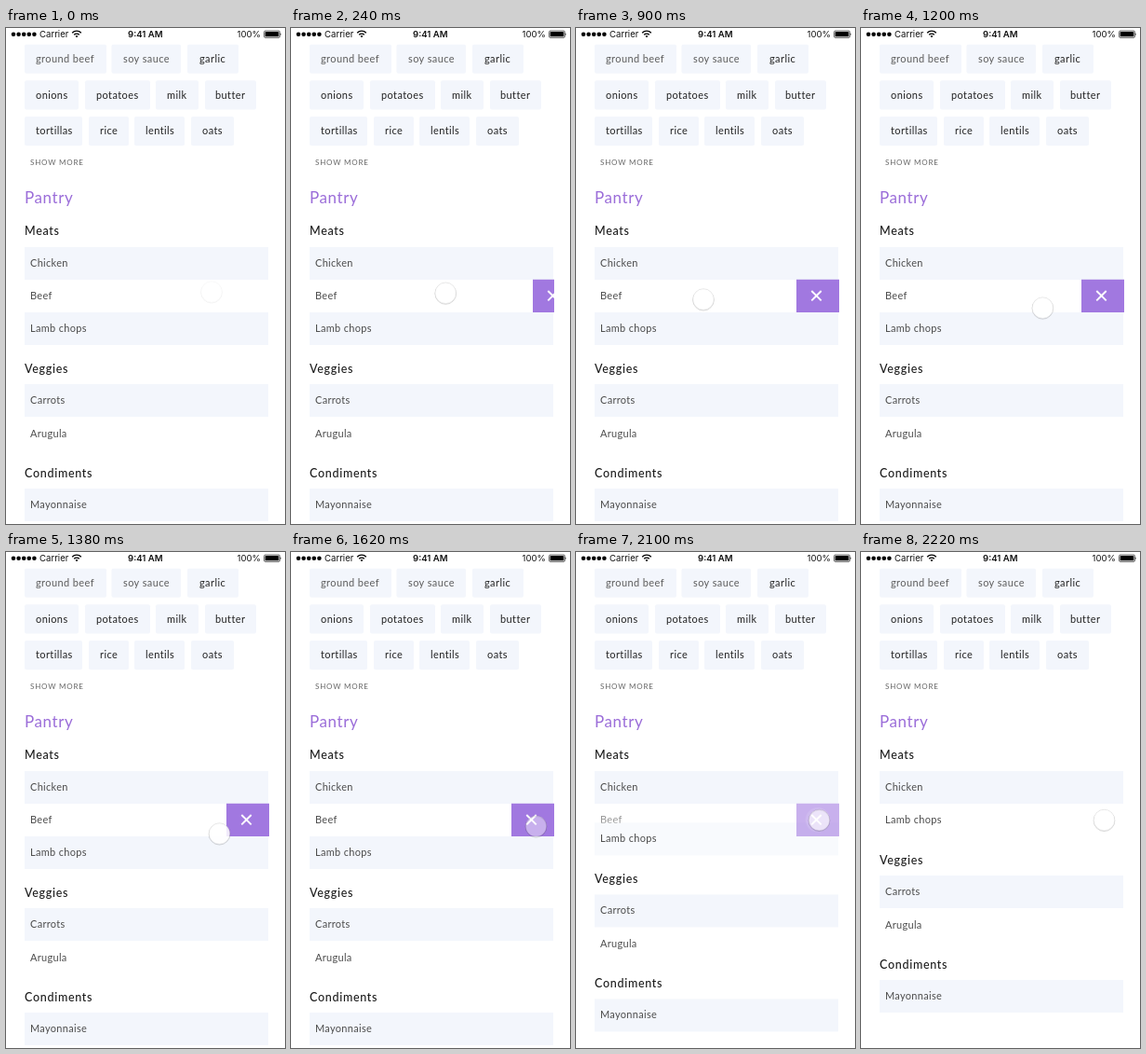
Recreate the animation shown at these times as an HTML page. Size 300 px wide and 532 px high, loop 2340 ms.

```html
<!DOCTYPE html>
<html lang="en">
<head>
<meta charset="utf-8">
<title>Pantry</title>
<style>
html, body { margin: 0; width: 100%; height: 100%; overflow: hidden; background: #fff; }
svg { display: block; width: 300px; height: 532px; }
text { font-family: Lato, "Open Sans", sans-serif; font-size: 11px; letter-spacing: .3px; fill: #4c4c4c; }
.chip { letter-spacing: .4px; fill: #222; }
.dim { fill: #5c5c5c; }
.head { font-size: 12.5px; font-weight: 500; letter-spacing: .7px; fill: #1c1c1c; }
.title { font-size: 17px; letter-spacing: .6px; fill: #9b6dd9; }
.more { font-size: 8px; letter-spacing: .8px; fill: #666; }
.bar text { font: 9.6px Inter, Roboto, sans-serif; letter-spacing: 0; fill: #111; }
.bar .time { font-weight: 600; }
.tint { fill: #f3f6fc; }
</style>
</head>
<body>
<svg viewBox="0 0 300 532">
  <defs><clipPath id="rowClip"><rect x="20" y="269.5" width="263" height="35.5"/></clipPath></defs>
  <g id="chips"></g>
  <text class="more" x="26" y="147.3">SHOW MORE</text>
  <text class="title" x="20" y="188.3">Pantry</text>
  <g id="top"></g>
  <g id="beef"></g>
  <g id="below"></g>
  <g clip-path="url(#rowClip)">
    <g id="remove">
      <rect x="237" y="269.5" width="46" height="35.5" fill="#a178e0"/>
      <path d="M253.3 282l10.4 10.4m0-10.4l-10.4 10.4" stroke="#fff" stroke-width="1.9"/>
    </g>
  </g>
  <circle id="ripple" fill="#fff"/>
  <g id="cursor">
    <circle cy=".8" r="11.3" fill="none" stroke="#000" stroke-opacity=".13"/>
    <circle id="disc" r="11.3" fill="#fff" stroke="#000" stroke-opacity=".12" stroke-width=".7"/>
  </g>
  <g class="bar">
    <rect width="300" height="17.5" fill="#fff"/>
    <path d="M8 6.7h23" stroke="#000" stroke-width="4.6" stroke-linecap="round" stroke-dasharray="0 5.6"/>
    <text x="36" y="10.4">Carrier</text>
    <g fill="none" stroke="#000" stroke-width="1.4">
      <path d="M71.2 5.2a6.6 6.6 0 0 1 9.6 0M73.2 7.3a4 4 0 0 1 5.6 0"/>
    </g>
    <path d="M74.6 8.7a2 2 0 0 1 2.8 0L76 10.2z"/>
    <text class="time" x="131" y="10.4">9:41 AM</text>
    <text x="248.5" y="10.4">100%</text>
    <rect x="277.5" y="3" width="17" height="7.4" rx="1.5" fill="none" stroke="#000" stroke-width=".6"/>
    <rect x="278.6" y="4.1" width="14.8" height="5.2" rx=".6"/>
    <path d="M295.3 5.4q1.4 1.3 0 2.6z"/>
  </g>
</svg>
<script>
const LOOP = 2340, STEP = 60, ROW = 35;
const $ = id => document.getElementById(id);
const text = (x, y, s, cls = "") => `<text class="${cls}" x="${x}" y="${y}">${s}</text>`;
const box = (x, y, w, h, r = 0, id = "") =>
  `<rect class="tint" id="${id}" x="${x}" y="${y}" width="${w}" height="${h}" rx="${r}"/>`;
const item = (y, s, tinted, id) => (tinted ? box(20, y, 262, ROW, 0, id) : "") + text(26, y + 21, s);

// Each chip: left edge, width, text start, label
const chipRows = [
  [[20, 88, 32, "ground beef"], [113.5, 74.5, 126, "soy sauce"], [195, 55, 208, "garlic"]],
  [[20, 58, 32, "onions"], [85, 70, 97, "potatoes"], [161, 46, 173, "milk"], [214, 55, 225, "butter"]],
  [[20, 62, 32, "tortillas"], [89, 43, 101, "rice"], [138, 54, 150, "lentils"], [199, 46, 211, "oats"]]
];
$("chips").innerHTML = chipRows.map((row, i) => row.map(([x, w, tx, s], j) => {
  const y = 17.5 + i * 38.7;
  return box(x, y, w, 31.3, 2) + text(tx, y + 19.5, s, i == 0 && j < 2 ? "chip dim" : "chip");
}).join("")).join("");

$("top").innerHTML = text(20, 222.3, "Meats", "head") + item(235, "Chicken", true);
$("beef").innerHTML = item(270, "Beef");
$("below").innerHTML =
  item(305, "Lamb chops", true, "lamb") +
  text(20, 369.8, "Veggies", "head") + item(382, "Carrots", true) + item(417.5, "Arugula") +
  text(20, 481.8, "Condiments", "head") + item(494, "Mayonnaise", true);

const smooth = u => u * u * (3 - 2 * u);
const span = (t, a, b) => Math.min(1, Math.max(0, (t - a) / (b - a)));
const mix = (a, b, u) => a + (b - a) * u;

// Interpolates [time, ...values] keys
function along(t, keys) {
  let i = 0;
  while (i < keys.length - 2 && t >= keys[i + 1][0]) i++;
  const [a, b] = [keys[i], keys[i + 1]], u = span(t, a[0], b[0]);
  return a.slice(1).map((v, k) => mix(v, b[k + 1], u));
}

const tapPath = [
  [720, 111.5, 285.5], [900, 137, 291], [1140, 184, 299.5],
  [1380, 229.5, 302], [1620, 263.5, 294], [1860, 261.5, 287.5]
];
const discAlpha = [[1260, .92], [1380, .85], [1620, .42], [2040, .42], [2220, 1]];

function draw(t) {
  const swipe = smooth(span(t, 0, 480));
  const [x, y] = t < 720 ? [mix(221, 111.5, swipe), mix(283, 285.5, swipe)] : along(t, tapPath);
  $("cursor").setAttribute("transform", `translate(${x} ${y})`);
  $("cursor").style.opacity = mix(.3, 1, span(t, 0, 180));
  $("disc").setAttribute("fill-opacity", along(t, discAlpha)[0]);

  const gone = smooth(span(t, 2020, 2200));
  $("remove").setAttribute("transform", `translate(${46 * (1 - smooth(span(t, 60, 420)))} 0)`);
  $("remove").style.opacity = $("beef").style.opacity = $("lamb").style.opacity = 1 - gone;
  $("below").setAttribute("transform", `translate(0 ${-ROW * gone})`);

  const tap = span(t, 1860, 1980), ripple = $("ripple");
  ripple.setAttribute("cx", 260);
  ripple.setAttribute("cy", 287.3);
  ripple.setAttribute("r", mix(8, 13.3, tap));
  ripple.style.opacity = .35 * tap * (1 - span(t, 1980, 2160));
}

function frame(now) {
  draw(Math.floor(now % LOOP / STEP) * STEP);
  requestAnimationFrame(frame);
}
draw(0);
requestAnimationFrame(frame);
</script>
</body>
</html>
```
